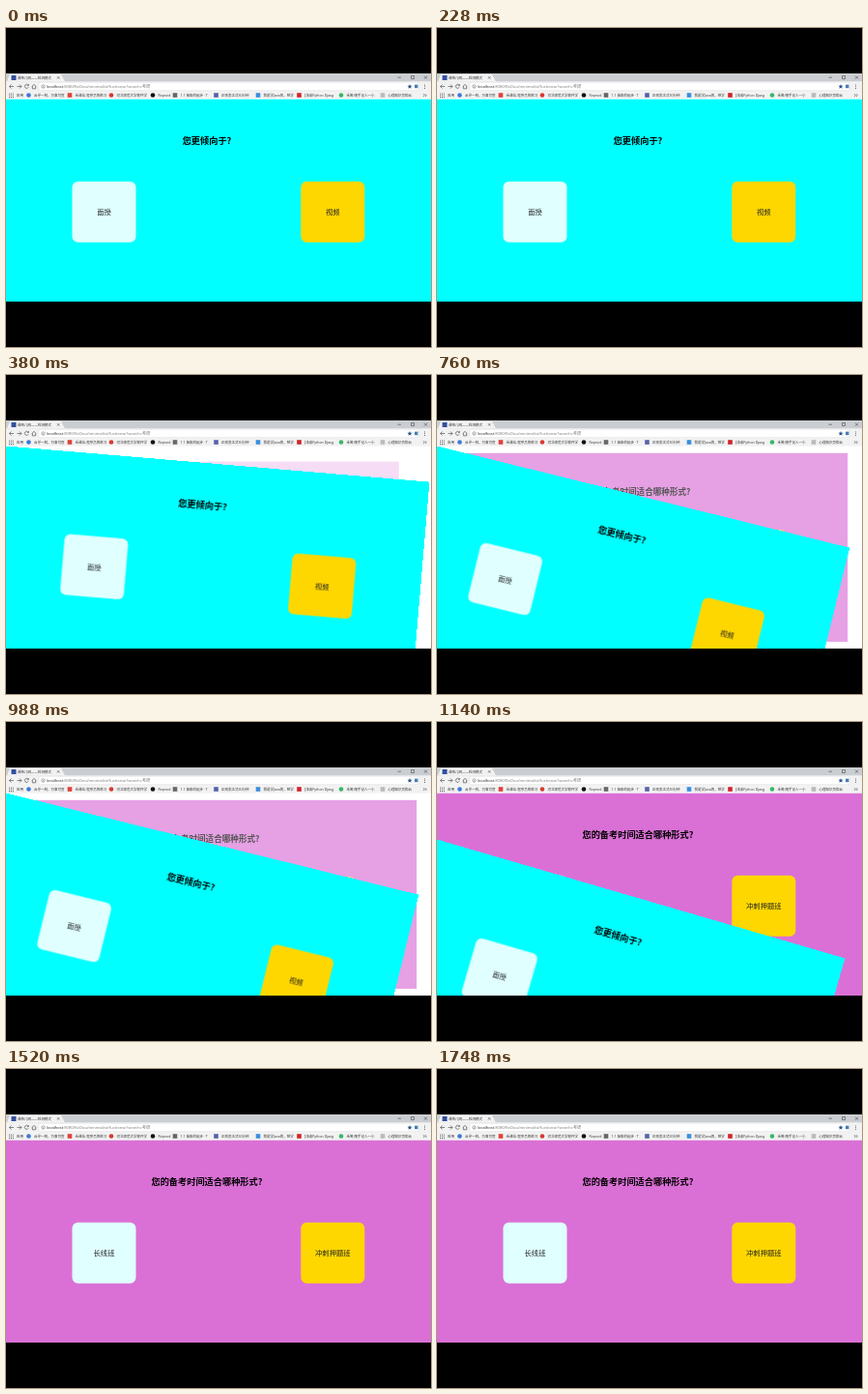
An HTML page that plays this animation: 440 by 330 pixels, repeating every 1.9 s.

```html
<!DOCTYPE html>
<html>
<head>
<meta charset="utf-8">
<title>Falling page transition</title>
<style>
  html, body { margin: 0; width: 100%; height: 100%; overflow: hidden; background: #000; }
  svg { display: block; }
  text { font-family: "Open Sans", "Noto Sans CJK SC", "Noto Sans CJK", sans-serif; }
  .page text { font-family: "Noto Sans CJK SC", "Noto Sans CJK", sans-serif; text-anchor: middle; }
  .title { font-size: 9.2px; font-weight: 700; }
  .label { font-size: 7.3px; fill: #222; }
  .small { font-size: 3.5px; fill: #333; }
  .line { fill: none; stroke: #555; stroke-width: .7; }
  #next { transform-origin: 220px 104.75px; }
  #front { transform-origin: 0 0; }
</style>
</head>
<body>
<svg id="stage" width="100%" height="100%" viewBox="0 0 440 330">
  <rect width="440" height="330"/>

  <!-- browser window -->
  <rect y="47" width="440" height="27" fill="#f2f2f2"/>
  <rect y="47" width="440" height="8.3" fill="#cacdd1"/>
  <path d="M1 55.4 4 48H57L61 55.4Z" fill="#f2f2f2"/>
  <rect x="5.5" y="49" width="5" height="5" fill="#33509e"/>
  <text x="12" y="52.9" class="small">课布儿网——检测模式</text>
  <path class="line" d="M53 50.2l2.4 2.4m0-2.4l-2.4 2.4M405.5 51.2h3.4M419.5 49.6h3v3h-3zM433 49.7l3 3m0-3l-3 3"/>

  <rect x="34" y="56.3" width="393" height="8.4" rx="1" fill="#fff" stroke="#d4d4d4" stroke-width=".4"/>
  <path class="line" d="M8 60.5H3.5l2-2m-2 2l2 2M11.5 60.5H16l-2-2m2 2l-2 2M23 59.2a2 2 0 1 0 .2 2M23.4 58v1.6h-1.6M26.6 60.7l2.4-2.3 2.4 2.3M27.4 60.2v2.6h3.2v-2.6"/>
  <circle class="line" cx="38.5" cy="60.5" r="1.7" style="stroke-width:.5"/>
  <path class="line" d="M38.5 60.2v1.3" style="stroke-width:.5"/>
  <text x="42" y="62" font-size="4.1" fill="#777"><tspan fill="#222">localhost</tspan>:8080/KeDou/minimalist/fuctionse?search=考研</text>
  <path d="M418 58l.7 1.7 1.8.1-1.4 1.2.5 1.8-1.6-1-1.6 1 .5-1.8-1.4-1.2 1.8-.1z" fill="#27548f"/>
  <rect x="423" y="58.6" width="3.4" height="3.6" fill="#4b7fae"/>
  <path d="M433.5 58.5v4.6" stroke="#555" stroke-width=".9" stroke-dasharray=".9 .9"/>

  <path d="M3 68h5M3 69.8h5M3 71.6h5" stroke="#777" stroke-width="1.1" stroke-dasharray="1.1 .8"/>
  <text x="11" y="71.1" class="small">应用</text>
  <g id="bookmarks"></g>
  <path class="line" d="M432 68.2l1.3 1.4-1.3 1.4m2-2.8l1.3 1.4-1.3 1.4"/>

  <!-- web page viewport -->
  <svg y="73.5" width="440" height="209.5">
    <rect width="440" height="209.5" fill="#fff"/>
    <g id="next" class="page"></g>
    <g id="front" class="page"></g>
  </svg>
</svg>

<script>
const byId = id => document.getElementById(id);

// x, icon colour, round icon, label
const bookmarks = [
  [23.5, '#3b78d8', true, '云寻一刻，万事可查'],
  [66, '#e0413a', false, '禾课站-程序员的练习'],
  [109, '#d8382f', true, '河北师范大学软件学'],
  [152, '#111', true, 'Repnod'],
  [175, '#666', false, '1.1 抽象的起步 · T'],
  [217.5, '#5562a8', false, '正则表达式30分钟'],
  [261, '#3a8ee0', false, '我是学Java的，想学'],
  [303.5, '#d3222a', false, '[浅谈Python Djang'],
  [347, '#35b768', true, '禾笺·随手记人一小'],
  [390, '#bbb', false, '心理知识页和云'],
];
byId('bookmarks').innerHTML = bookmarks.map(([x, color, round, label]) => `
  <rect x="${x - 2.3}" y="67.2" width="4.6" height="4.6" rx="${round ? 2.3 : 0}" fill="${color}"/>
  <text x="${x + 5.6}" y="71.1" class="small">${label}</text>`).join('');

const card = (x, color, label) => `
  <rect x="${x}" y="85.3" width="66" height="63" rx="6" fill="${color}"/>
  <text x="${x + 33}" y="119.7" class="label">${label}</text>`;

const page = (color, title, left, right) => `
  <rect width="440" height="209.5" fill="${color}"/>
  <text x="208" y="46.8" class="title">${title}</text>
  ${card(68.5, 'lightcyan', left)}${card(305.3, 'gold', right)}`;

byId('front').innerHTML = page('cyan', '您更倾向于?', '面授', '视频');
byId('next').innerHTML = page('orchid', '您的备考时间适合哪种形式?', '长线班', '冲刺押题班');

const pose = (y, angle) => `translateY(${y}px) rotate(${angle}deg)`;
const fall = byId('front').animate([
  { offset: 0, transform: pose(0, 0), easing: 'ease-in' },
  { offset: .2, transform: pose(0, 10), easing: 'ease-out' },
  { offset: .4, transform: pose(0, 17), easing: 'ease-in' },
  { offset: .6, transform: pose(0, 16), easing: 'ease-in' },
  { offset: 1, transform: pose(209.5, 17) },
], { duration: 1000, fill: 'both' });

const scaleUp = byId('next').animate([
  { opacity: 0, transform: 'scale(.8)' },
  { opacity: 1, transform: 'scale(1)' },
], { duration: 700, delay: 5, easing: 'ease', fill: 'both' });

const transitions = [fall, scaleUp];
transitions.forEach(a => a.pause());

// The transition is seen at these moments, each held for HOLD ms.
const moments = [0, 129, 276, 766, 1000];
const HOLD = 380;

function draw() {
  const step = Math.floor(performance.now() / HOLD) % moments.length;
  transitions.forEach(a => { a.currentTime = moments[step]; });
  requestAnimationFrame(draw);
}
draw();
</script>
</body>
</html>
```
